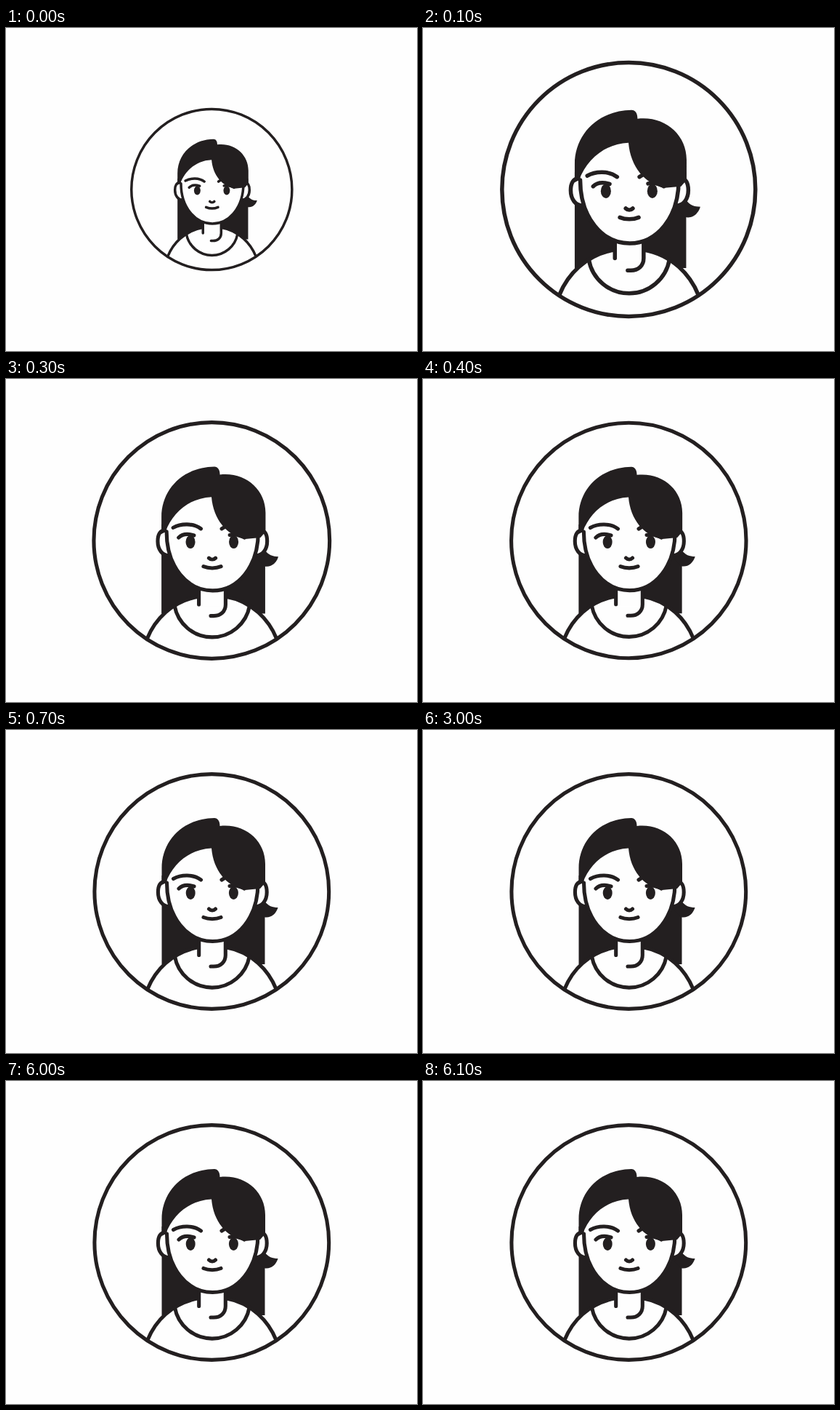
Animation, 566 px wide and 444 px high, one loop 8.5 s. Source, as an HTML page:

```html
<!DOCTYPE html>
<html lang="en">
<head>
<meta charset="utf-8">
<title>Avatar pop</title>
<style>
html, body { margin: 0; width: 100%; height: 100%; overflow: hidden; background: #fefefe; }
svg { display: block; width: 100vw; height: 100vh; }
.ink { fill: #231f20; }
.line { fill: none; stroke: #231f20; stroke-width: 5.1; stroke-linecap: round; stroke-linejoin: round; }
.skin { fill: #fefefe; }
</style>
</head>
<body>
<svg viewBox="0 0 566 444">
  <g id="avatar">
    <!-- back hair and flick -->
    <path class="ink" d="M214.5 200H356.5V322H214.5Z"/>
    <path class="ink" d="M356 235C361 242 367 244 374.5 244C372 253 364 259.5 355 257L346 248Z"/>
    <!-- ears -->
    <path class="line skin" d="M222 208.5C212 206.5 209.4 215 209.4 223C209.4 234 215.500 243 225 242.500"/>
    <path class="line skin" d="M347 208.5C357 206.5 359.2 215 359.2 223C359.2 234 353 243 343.500 242.500"/>
    <!-- body and neck -->
    <path class="skin" d="M195 356C205 331 228 305 266 298.500H302C339 305 362 331 372 356C325 394 242 394 195 356Z"/>
    <path class="line" d="M195 356C205 331 228 305 266 298.500M302 298.500C339 305 362 331 372 356"/>
    <path class="skin" d="M266 282H302V312H266Z"/>
    <path class="line" d="M265.700 288V309.500M302.300 288V309.500C302.300 319 295.500 325 286 325H282"/>
    <path class="line" d="M232.400 311A52.200 52.200 0 0 0 335.200 311"/>
    <!-- face -->
    <path class="skin" d="M221.500 210C221.500 258 250 290.500 284.500 290.500C319 290.500 347 258 347 210V180L284 150L221.500 180Z"/>
    <path class="line" d="M221.500 210C221.500 258 250 290.500 284.500 290.500C319 290.500 347 258 347 210"/>
    <path class="line" d="M230.500 204.500C241 198.500 258 198 268.500 206M297 206L301 203.500"/>
    <path class="line" d="M238 218C243 213 251 212.500 259 215M308 214.500C316 213 322 214 328 218"/>
    <ellipse class="ink" cx="254.200" cy="224" rx="6.500" ry="9"/>
    <ellipse class="ink" cx="313.400" cy="224" rx="6.500" ry="9"/>
    <path class="line" d="M279.500 246C282 248.500 286 248.500 288.500 246M272 257.500C279 260.500 289 260.500 296 257.500"/>
    <!-- front hair -->
    <path class="ink" d="M214.500 213V190C214.500 151 245 121.500 287 121C291.500 121 294.500 125 294.500 132C329 128 357 152 357 184V210L350 218L329 220C304 215 285.500 193 283 162.500C252 164 230 184 220 210Z"/>
    <circle class="line" cx="283.300" cy="222" r="161.400"/>
  </g>
</svg>
<script>
const LOOP = 8500, STEP = 100, CX = 283.3, CY = 222;
const avatar = document.getElementById('avatar');
// quick pop past full size, then settling
const pop = [0.685, 1.081, 1.032, 1.006, 1.002];

function draw(ms) {
  const s = pop[Math.floor(ms / STEP)] ?? 1;
  avatar.setAttribute('transform', `translate(${CX} ${CY}) scale(${s}) translate(${-CX} ${-CY})`);
}

const start = performance.now();
function tick(now) {
  draw(Math.max(0, now - start) % LOOP);
  requestAnimationFrame(tick);
}
draw(0);
requestAnimationFrame(tick);
</script>
</body>
</html>
```
